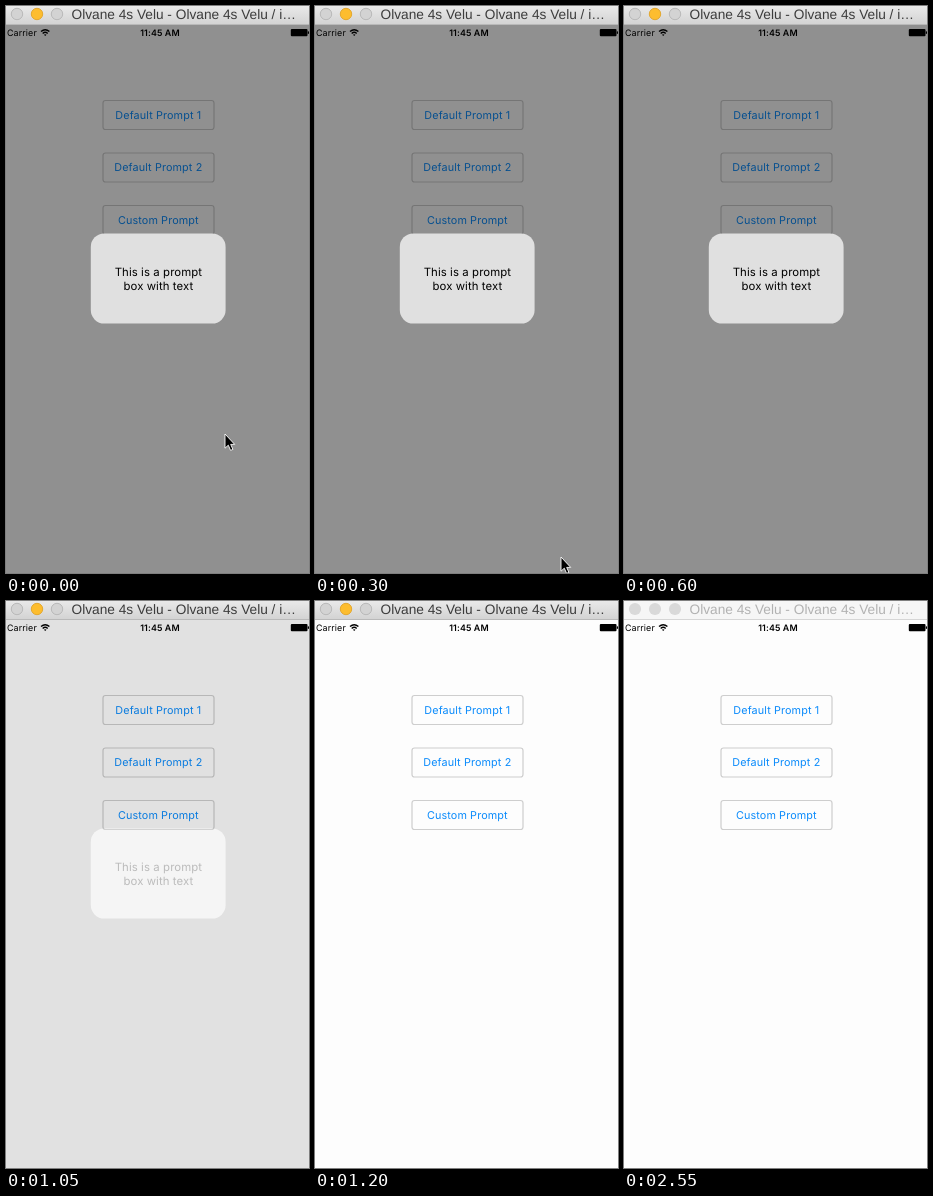
An HTML page for the animation above (2650 ms loop, 303 by 567 pixels).

```html
<!DOCTYPE html>
<html lang="en">
<head>
<meta charset="utf-8">
<title>Prompt box</title>
<style>
  html, body { margin: 0; width: 100%; height: 100%; overflow: hidden; background: #fdfdfd; }
  svg { display: block; width: 100vw; height: 100vh; }
  text { font-family: Inter, sans-serif; text-rendering: geometricPrecision; }
  .title { font: 13.7px "Liberation Sans", sans-serif; }
  .mid { text-anchor: middle; }
  .button text { font-size: 10.8px; letter-spacing: .12px; fill: #0b8bfb; }
  .button rect { fill: none; stroke: #cecece; stroke-width: 1.2; }
  .status { font-size: 8.9px; letter-spacing: .12px; }
  .prompt text { font-size: 11.4px; letter-spacing: .08px; }
</style>
</head>
<body>
<svg viewBox="0 0 303 567" preserveAspectRatio="none">
  <defs>
    <linearGradient id="bar" x2="0" y2="1">
      <stop stop-color="#e9e9e9"/>
      <stop offset="1" stop-color="#d2d2d2"/>
    </linearGradient>
  </defs>
  <rect width="303" height="567" fill="#fdfdfd"/>

  <g class="status">
    <text x="1" y="30">Carrier</text>
    <g fill="none" stroke="#000" stroke-width="1.4">
      <path d="M35 25.6Q39.2 21.7 43.4 25.6"/>
      <path d="M36.7 27.5Q39.2 25.2 41.7 27.5"/>
    </g>
    <path d="M37.9 28.7Q39.2 27.6 40.5 28.7L39.2 30Z"/>
    <text class="mid" x="154" y="30" font-weight="600">11:45 AM</text>
    <rect x="284.8" y="23" width="16.7" height="7.2" rx="1"/>
    <rect x="301.8" y="25.4" width="1.2" height="2.4"/>
  </g>

  <g id="buttons"></g>

  <g id="overlay" class="prompt">
    <rect y="19" width="303" height="548" fill-opacity=".43"/>
    <rect x="84.8" y="227.4" width="134.8" height="90.2" rx="13.5" fill="#e0e0e0"/>
    <text class="mid" x="152.4" y="269.8">This is a prompt</text>
    <text class="mid" x="152.4" y="284">box with text</text>
  </g>

  <g id="active">
    <rect width="303" height="19" fill="url(#bar)"/>
    <rect y="18" width="303" height="1" fill="#b9b9b9"/>
    <g fill="#d3d3d3" stroke="#b9b9b9">
      <circle cx="11" cy="8" r="5.7"/>
      <circle cx="31" cy="8" r="5.7" fill="#fdbd2e" stroke="#e3a830"/>
      <circle cx="51" cy="8" r="5.7"/>
    </g>
    <text class="title" x="65.5" y="13" fill="#3c3c3c">Olvane 4s Velu - Olvane 4s Velu / i…</text>
  </g>
  <g id="inactive">
    <rect width="303" height="19" fill="#f6f6f6"/>
    <rect y="18" width="303" height="1" fill="#d6d6d6"/>
    <g fill="#d9d9d9">
      <circle cx="11" cy="8" r="6.1"/>
      <circle cx="31" cy="8" r="6.1"/>
      <circle cx="51" cy="8" r="6.1"/>
    </g>
    <text class="title" x="65.5" y="13" fill="#b2b2b2">Olvane 4s Velu - Olvane 4s Velu / i…</text>
  </g>

  <path id="cursor" d="M2 1V15.2L5.3 12.2L7.6 17.4L9.9 16.4L7.7 11.4H11.7Z" stroke="#fff" stroke-width=".9"/>
</svg>
<script>
  const LOOP = 2650;
  const STEP = 150;
  const pointer = [[217, 427], [236, 506], [244, 550], [254, 561]];
  const $ = id => document.getElementById(id);
  const show = (id, on) => $(id).setAttribute('visibility', on ? 'visible' : 'hidden');

  $('buttons').innerHTML = ['Default Prompt 1', 'Default Prompt 2', 'Custom Prompt'].map((label, i) =>
    `<g class="button" transform="translate(0 ${i * 52.5})">
      <rect x="97" y="94.5" width="111" height="29" rx="2.5"/>
      <text class="mid" x="152.3" y="112.9">${label}</text>
    </g>`).join('');

  function fade(t) {
    if (t < 900) return 1;
    if (t < 1050) return 0.753;
    return t < 1200 ? 0.256 : 0;
  }

  function draw(t) {
    const at = pointer[Math.floor(t / STEP)];
    show('cursor', at);
    if (at) $('cursor').setAttribute('transform', `translate(${at})`);
    $('overlay').setAttribute('opacity', fade(t));
    show('active', t < 2550);
    show('inactive', t >= 2550);
  }

  const start = performance.now();
  function tick() {
    draw((performance.now() - start) % LOOP);
    requestAnimationFrame(tick);
  }
  tick();
</script>
</body>
</html>
```
